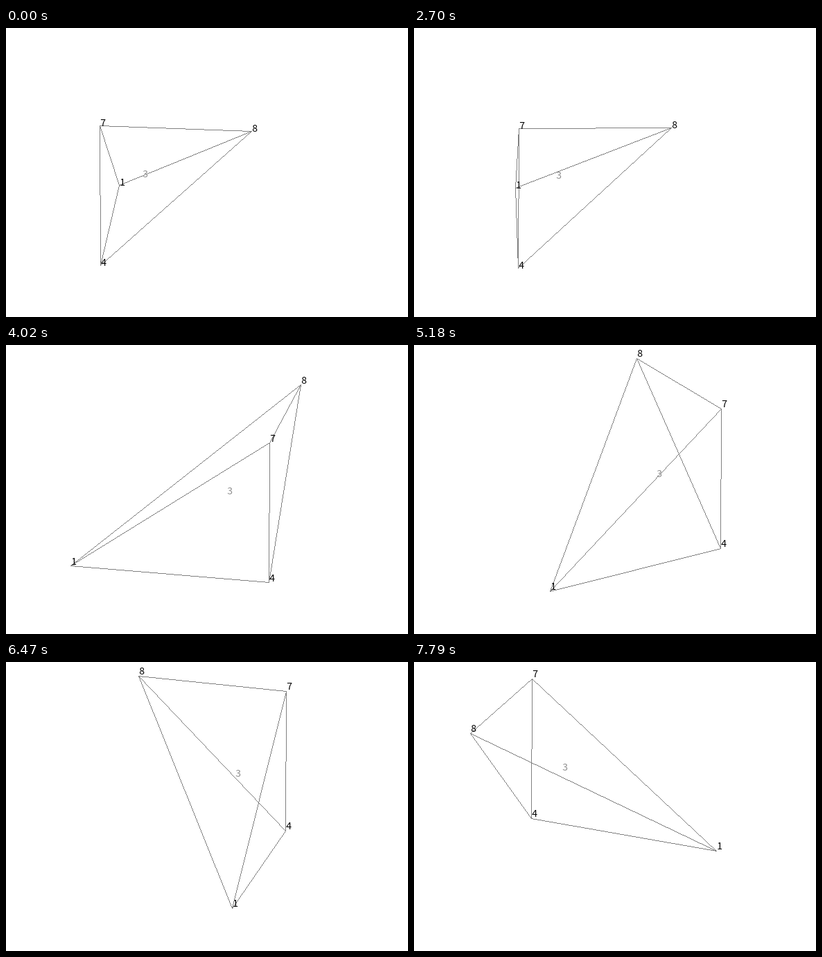
Write an HTML page that moves like this. It is 580 px wide and 418 px high and loops after 8 s.

```html
<!DOCTYPE html>
<html lang="en">
<head>
<meta charset="utf-8">
<title>Turning tetrahedron</title>
<style>
  html, body { margin: 0; width: 100%; height: 100%; overflow: hidden; background: #fff; }
  svg { display: block; width: 580px; height: 418px; }
  path { fill: #808080; shape-rendering: crispEdges; }
  text {
    font: 14px "Noto Sans CJK SC", "Noto Sans CJK JP", "DejaVu Sans", sans-serif;
    text-anchor: middle;
    fill: #000;
  }
  .inner { fill: #909090; }
</style>
</head>
<body>
<svg id="stage" viewBox="0 0 580 418"></svg>
<script>
const LOOP = 8000, STEP = 40, RAD = Math.PI / 180;
const AXIS = 259.15, TOP = 87.5, BOTTOM = 289;
const EDGES = ["78", "71", "74", "18", "14", "48"];
const LABELS = ["3", "7", "8", "1", "4"];

// Two drags with a rest between them: [time, turn in degrees]
const TURN = [
  [0, -42], [2540, -42], [3340, 0], [4020, 41.2], [4420, 70], [4690, 70],
  [5150, 86.4], [5510, 89.6], [6470, 128.2], [7190, 176.8], [7790, 209], [LOOP, 209]
];

const stage = document.getElementById("stage");

function add(tag) {
  return stage.appendChild(document.createElementNS("http://www.w3.org/2000/svg", tag));
}

const wires = add("path");
const texts = LABELS.map(name => {
  const node = add("text");
  node.textContent = name;
  if (name === "3") node.setAttribute("class", "inner");
  return node;
});

// Monotone cubic: smooth where it moves, flat where it rests.
function smooth(keys, t) {
  const rate = i => (keys[i + 1][1] - keys[i][1]) / (keys[i + 1][0] - keys[i][0]);
  const slope = i => {
    const a = rate(i - 1), b = rate(i);
    return a * b > 0 ? 2 * a * b / (a + b) : (a + b) * 0.6;
  };
  const i = keys.findIndex((key, n) => n === keys.length - 2 || t < keys[n + 1][0]);
  const [t0, a] = keys[i], [t1, b] = keys[i + 1];
  if (a === b) return a;
  const h = t1 - t0, u = (t - t0) / h, v = 1 - u;
  return a * v * v * (1 + 2 * u) + b * u * u * (3 - 2 * u)
    + h * u * v * (slope(i) * v - slope(i + 1) * u);
}

function stepped(t) {
  const offset = t < 4730 ? 20 : 30;
  return Math.max(0, Math.floor((t - offset) / STEP) * STEP + offset);
}

// Corners circle an upright axis seen from above; the lean tilts the axis slightly.
function corners(angle, lean) {
  const a = angle * RAD, b = (angle - 106.3) * RAD;
  const x7 = 184 * Math.sin(a), y7 = 72 * Math.cos(a);
  const x1 = 182.5 * Math.sin(b), y1 = 72.3 * Math.cos(b);
  return {
    7: [AXIS + x7 + lean, TOP + y7],
    4: [AXIS + x7 - lean, TOP + y7 + 202],
    1: [AXIS + x1 - lean, BOTTOM + y1],
    8: [AXIS - x1 + lean, TOP - y1],
    3: [AXIS + x7 / 2 - 1, (TOP + BOTTOM + y7) / 2]
  };
}

// One unit square per step along the longer direction: a line without blending.
function pixelLine([x0, y0], [x1, y1]) {
  const n = Math.max(Math.abs(x1 - x0), Math.abs(y1 - y0), 1);
  let d = "";
  for (let i = 0; i <= n; i++) {
    const x = Math.round(x0 + (x1 - x0) * i / n);
    const y = Math.round(y0 + (y1 - y0) * i / n);
    d += `M${x} ${y}h1v1h-1z`;
  }
  return d;
}

function draw(t) {
  const angle = smooth(TURN, stepped(t));
  const p = corners(angle, t < 1490 ? -0.4 : 0.4);
  for (const name in p) p[name] = p[name].map(Math.floor);

  wires.setAttribute("d", EDGES.map(([from, to]) => pixelLine(p[from], p[to])).join(""));

  const rise = Math.max(-7, -4.8 - 0.03 * angle);
  LABELS.forEach((name, i) => {
    const [x, y] = p[name];
    texts[i].setAttribute("x", x + 5.2);
    texts[i].setAttribute("y", Math.round(y + 4.8 + (name === "3" ? -4 : rise)));
  });
}

const begin = performance.now();
function tick() {
  draw((performance.now() - begin) % LOOP);
  requestAnimationFrame(tick);
}
tick();
</script>
</body>
</html>
```
